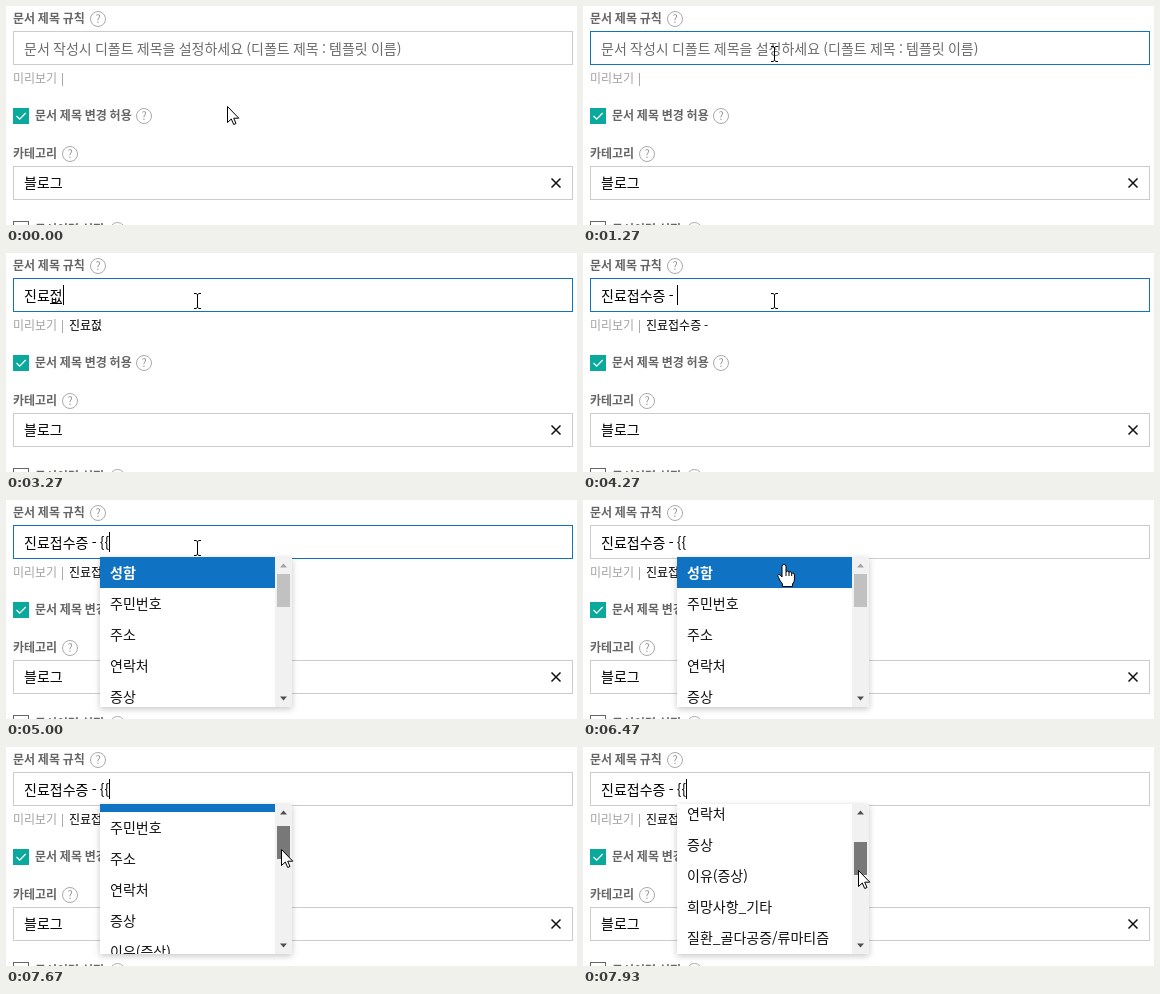
An HTML page for the animation above (8000 ms loop, 571 by 219 pixels).

```html
<!DOCTYPE html>
<html lang="ko">
<head>
<meta charset="utf-8">
<title>문서 제목 규칙</title>
<style>
html, body { margin: 0; width: 571px; height: 219px; overflow: hidden; background: #fff; }
svg { display: block; }
text { font: 14px "Noto Sans CJK KR", "Noto Sans CJK", "Noto Sans", sans-serif; fill: #111; white-space: pre; word-spacing: -.048em; }
.label { font-size: 12px; font-weight: 700; fill: #666; }
.small { font-size: 12px; }
.value { font-weight: 500; fill: #000; }
.mark { font-size: 11px; fill: #999; text-anchor: middle; }
.box { fill: #fff; stroke: #ccc; }
.on { font-weight: 700; fill: #fff; }
#popup { filter: drop-shadow(0 2px 3px rgba(0,0,0,.22)); }
#cursors path { fill: #fff; stroke: #000; }
</style>
</head>
<body>
<svg id="stage" width="571" height="219" viewBox="0 0 571 219">
  <defs><clipPath id="view"><rect x="94" y="57" width="175" height="150"/></clipPath></defs>
  <g id="labels"></g>

  <rect id="field" class="box" x="7.5" y="25.5" width="559" height="33"/>
  <text id="hint" x="18" y="48" style="fill:#6c6c6c">문서 작성시 디폴트 제목을 설정하세요 (디폴트 제목 : 템플릿 이름)</text>
  <text id="typed" class="value" x="18" y="48"></text>
  <rect id="under" y="50" height="1"/>
  <rect id="caret" y="32" width="1" height="20"/>

  <text class="small" x="7" y="77" style="fill:#a2a2a2">미리보기</text>
  <rect x="56" y="67" width="1" height="13" fill="#aaa"/>
  <text id="preview" class="small value" x="63" y="77"></text>

  <rect x="7" y="102" width="16" height="16" fill="#0ba99c"/>
  <path d="M10.5 110l3.2 3.2 6-6.2" fill="none" stroke="#fff" stroke-width="1.2"/>
  <rect class="box" x="7.5" y="215.5" width="15" height="15" style="stroke:#666"/>

  <rect class="box" x="7.5" y="160.5" width="559" height="33"/>
  <text class="value" x="18" y="182">블로그</text>
  <path d="M545.5 172.5l9 9m0-9l-9 9" stroke="#111" stroke-width="1.5"/>

  <g id="popup">
    <rect x="94" y="57" width="192" height="150" fill="#fff"/>
    <g clip-path="url(#view)"><g id="list"></g></g>
    <rect x="269" y="57" width="17" height="150" fill="#f1f1f1"/>
    <rect id="thumb" x="271" width="13" height="33"/>
    <path id="up" d="M274 67.5h7l-3.5-4z"/>
    <path d="M274 196.5h7l-3.5 4z" fill="#505050"/>
  </g>

  <g id="cursors">
    <path id="arrow" d="M.5 .5V16.5L4.3 13L6.7 18.5L9 17.5L6.7 12.2H11.8Z"/>
    <path id="beam" d="M-3.5 -7.5H-1.5L0 -6.5L1.5 -7.5H3.5M0 -6.5V6.5M-3.5 7.5H-1.5L0 6.5L1.5 7.5H3.5" style="fill:none"/>
    <path id="hand" d="M-2 2Q-2 .5 0 .5T2 2V7.5Q3.5 6.5 5 8Q6.7 7 7.7 9Q10 8.3 10.5 11V15Q10.5 18 8.5 20V22.5H-1.5V20Q-4 17 -5.5 13.5Q-7 11 -5.5 10.5Q-4 10 -2 13ZM2 7.5V12M5 8V12M7.7 9V12"/>
  </g>
</svg>
<script>
const NS = 'http://www.w3.org/2000/svg', LOOP = 8000, FPS = 15, BLUE = '#0f72c3', ROW = 31;
const $ = id => document.getElementById(id);
const set = (el, attrs) => { for (const k in attrs) el.setAttribute(k, attrs[k]); return el; };
const add = (parent, tag, attrs, text = '') => {
  const el = set(parent.appendChild(document.createElementNS(NS, tag)), attrs);
  el.textContent = text;
  return el;
};
const show = (id, on) => { $(id).style.display = on ? '' : 'none'; };

// label, x, middle, help icon x
for (const [text, x, y, help] of [
  ['문서 제목 규칙', 7, 13, 92],
  ['문서 제목 변경 허용', 29, 110, 138],
  ['카테고리', 7, 148, 64],
  ['문서이력 설정', 29, 224, 111.5]
]) {
  add($('labels'), 'text', { class: 'label', x, y: y + 4.3 }, text);
  add($('labels'), 'circle', { cx: help, cy: y, r: 7.5, fill: 'none', stroke: '#aaa' });
  add($('labels'), 'text', { class: 'mark', x: help, y: y + 4 }, '?');
}

const rows = ['성함', '주민번호', '주소', '연락처', '증상', '이유(증상)', '희망사항_기타', '질환_골다공증/류마티즘']
  .map((name, i) => ({
    back: add($('list'), 'rect', { x: 94, y: 57 + i * ROW, width: 175, height: ROW, fill: BLUE }),
    text: add($('list'), 'text', { x: 104, y: 78 + i * ROW }, name)
  }));

// time typed, text, time it reaches the preview
const KEYS = [
  [0, '', 0],
  [2000, 'ㅈ', 2070], [2130, '지', 2200], [2270, '진', 2330], [2400, '진ㄹ', 2470], [2470, '진료', 2530],
  [2870, '진룢', 2930], [3000, '진료저', 3070], [3130, '진료접', 3200], [3200, '진료젒', 3270],
  [3330, '진료접수', 3400], [3400, '진료접숮', 3470], [3470, '진료접수즈', 3530], [3600, '진료접수증', 3670],
  [3930, '진료접수증 ', 3930], [4070, '진료접수증 -', 4270], [4130, '진료접수증 - ', 4270],
  [4730, '진료접수증 - {', 4800], [4870, '진료접수증 - {{', 4930]
];
const BLINK = [730, 1270, 1800];
const MOVE = [
  [0, 221, 101], [330, 187, 57], [469, 187, 57], [470, 191, 54], [530, 191, 48],
  [6200, 191, 48], [6400, 196, 57], [6600, 210, 76], [6900, 243, 110], [7070, 266, 106], [7130, 270, 103],
  [7200, 273, 101], [7330, 275, 98], [7530, 275, 98], [7670, 275, 102], [7930, 275, 122], [8000, 275, 127]
];
const SCROLL = [[0, 0], [7530, 0], [7670, 23], [7930, 97], [8000, 116]];

const last = (t, col) => KEYS.filter(k => k[col] <= t).pop()[1];
function at(table, t) {
  const i = Math.max(1, table.findIndex(k => k[0] > t));
  const a = table[i - 1], b = table[i], p = (t - a[0]) / (b[0] - a[0]);
  return a.slice(1).map((v, j) => Math.round(v + (b[j + 1] - v) * p));
}

const pen = document.createElement('canvas').getContext('2d');
function width(text) {
  pen.font = getComputedStyle($('typed')).font;
  return pen.measureText(text).width;
}

function caretOn(t) {
  if (t < 2000) return BLINK.filter(b => b <= t).length % 2;
  return t < 5400 || t >= 6990 || Math.floor((t - 5400) / 530) % 2;
}

function draw(time) {
  const t = Math.floor((time + 5) * FPS / 1000) * 1000 / FPS + 4;
  const [x, y] = at(MOVE, t), [scroll] = at(SCROLL, t);

  const text = last(t, 0), composing = text && t < 3930;
  $('typed').textContent = text;
  $('preview').textContent = last(t, 2);
  show('hint', !text);
  show('under', composing);
  if (composing) set($('under'), { x: Math.round(18.5 + width(text.slice(0, -1))), width: 12 });
  set($('caret'), { x: Math.round(18 + width(text)) });
  show('caret', caretOn(t));

  const inField = y < 58, overList = !inField && t > 6200 && t < 7200;
  $('field').style.stroke = inField ? BLUE : '#ccc';

  show('popup', t >= 4930);
  set($('list'), { transform: `translate(0 ${-scroll})` });
  rows.forEach((row, i) => {
    const on = (i === 0 && t >= 5000) || (overList && i === Math.floor((y - 57) / ROW));
    row.back.style.display = on ? '' : 'none';
    row.text.setAttribute('class', on ? 'on' : '');
  });
  set($('thumb'), {
    y: 74 + Math.round(scroll / 4.7),
    fill: t >= 7460 ? '#787878' : t >= 7200 ? '#a8a8a8' : '#c1c1c1'
  });
  set($('up'), { fill: scroll ? '#505050' : '#a3a3a3' });

  const kind = t < 470 ? 'arrow' : inField ? 'beam' : overList ? 'hand' : 'arrow';
  for (const id of ['arrow', 'beam', 'hand']) show(id, id === kind);
  set($('cursors'), { transform: kind === 'beam' ? `translate(${x + .5} ${y})` : `translate(${x} ${y})` });
}

const start = performance.now();
function tick() {
  draw((performance.now() - start) % LOOP);
  requestAnimationFrame(tick);
}
tick();
</script>
</body>
</html>
```
